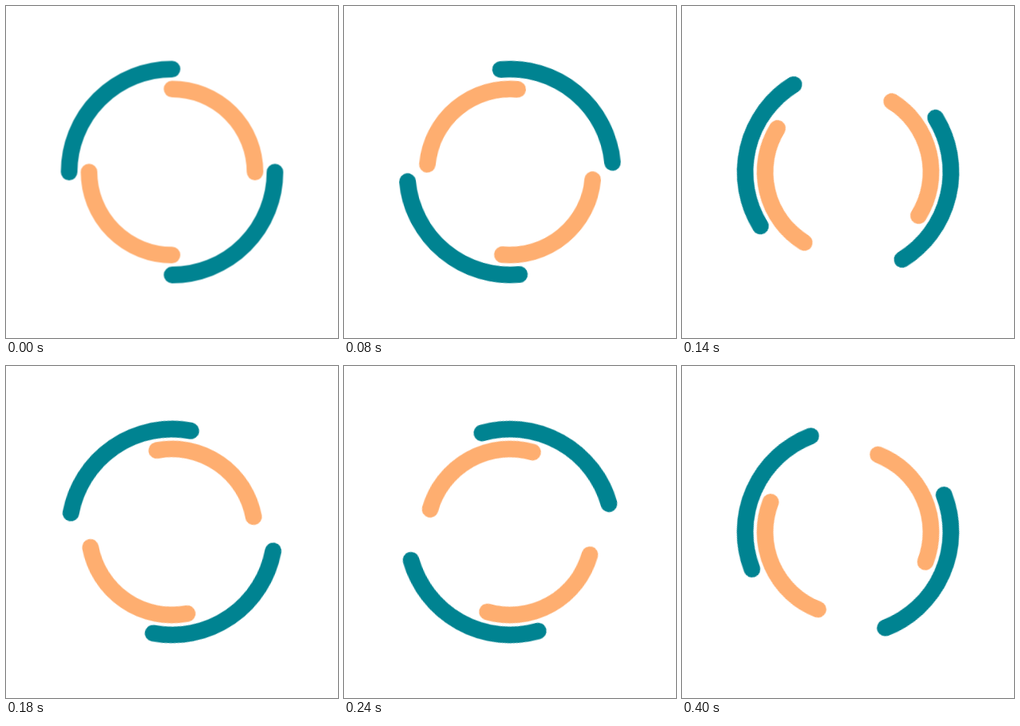
An HTML page for the animation above (0.42 s loop, 416 by 416 pixels).

```html
<!DOCTYPE html>
<html lang="en">
<head>
<meta charset="utf-8">
<title>Double ring spinner</title>
<style>
  html, body { margin: 0; width: 100%; height: 100%; overflow: hidden; background: #fff; }
  svg { display: block; width: 100vw; height: 100vh; }
  path { fill: none; stroke-width: 5; stroke-linecap: round; transform-origin: 50px 50px; }
  #outer { stroke: #008391; }
  #inner { stroke: #feae70; }
</style>
</head>
<body>
<svg viewBox="0 0 100 100">
  <path id="outer" d="M81 50A31 31 0 0 1 50 81M19 50A31 31 0 0 1 50 19"/>
  <path id="inner" d="M50 75A25 25 0 0 1 25 50M50 25A25 25 0 0 1 75 50"/>
</svg>
<script>
  const LOOP = 420;
  const STEP = 360 / 17;

  // [time in ms, step reached, easing to the next row]; the turn pauses on step 12
  const table = [
    [0, 0, 'steps(12)'],
    [240, 12, 'linear'],
    [320, 12, 'steps(5)'],
    [LOOP, 17, 'linear']
  ];

  function spin(id, direction) {
    const frames = table.map(([time, step, easing]) => ({
      offset: time / LOOP,
      transform: `rotate(${direction * step * STEP}deg)`,
      easing
    }));
    // The tiny negative delay keeps rounding off the step edges
    const turn = document.getElementById(id).animate(frames, {
      duration: LOOP, iterations: Infinity, delay: -0.05
    });
    turn.startTime = 0;
  }

  spin('outer', 1);
  spin('inner', -1);
</script>
</body>
</html>
```
